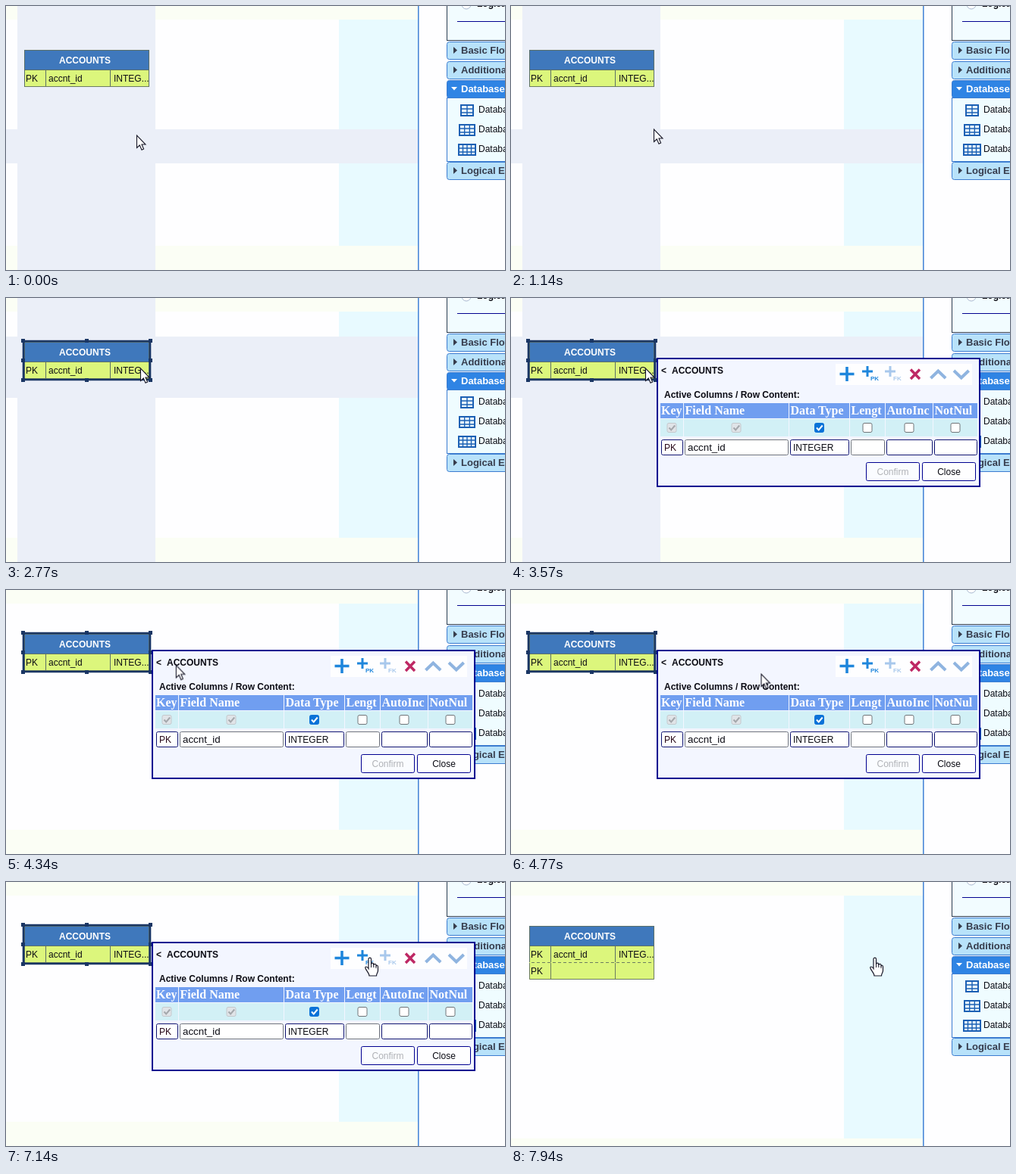
Recreate the animation shown at these times as an HTML page. Size 658 px wide and 349 px high, loop 8000 ms.

```html
<!DOCTYPE html>
<html lang="en">
<head>
<meta charset="utf-8">
<title>Table editor</title>
<style>
html, body { margin: 0; width: 100%; height: 100%; overflow: hidden; background: #fefeff; }
svg { display: block; }
text { font-family: "Liberation Sans", Arial, sans-serif; font-size: 12px; fill: #0c0c14; white-space: pre; }
.b { font-weight: bold; }
.w { fill: #fff; }
.menu { font-size: 13px; font-weight: bold; fill: #363c4c; }
.menu.w { fill: #fff; }
.th { font: bold 16px "Liberation Serif", Times, serif; fill: #fff; }
rect { shape-rendering: crispEdges; }
.soft { shape-rendering: auto; }

.anim { animation: 8s step-end infinite; visibility: hidden; }
#column { animation-name: column; }
#rowLow { animation-name: rowLow; }
#rowMid { animation-name: rowMid; }
#rowTop { animation-name: rowTop; }
#outline { animation-name: outline; }
#handles { animation-name: handles; }
#dialog { animation-name: dialog; }
#added { animation-name: added; }
#arrow { animation-name: arrow; }
#hand { animation-name: hand; }
#pointer { animation: move 8s linear infinite; }

@keyframes column { 0% { visibility: visible; } 52.7% { visibility: hidden; } }
@keyframes rowLow { 0% { visibility: visible; } 17.5% { visibility: hidden; } }
@keyframes rowMid { 17.5% { visibility: visible; } 21.4% { visibility: hidden; } }
@keyframes rowTop { 21.4% { visibility: visible; } 52.7% { visibility: hidden; } }
@keyframes outline { 21.4% { visibility: visible; } 97.2% { visibility: hidden; } }
@keyframes handles { 33% { visibility: visible; } 97.2% { visibility: hidden; } }
@keyframes dialog { 43% { visibility: visible; } 97.2% { visibility: hidden; } }
@keyframes added { 97.2% { visibility: visible; } }
@keyframes arrow { 0% { visibility: visible; } 78.2% { visibility: hidden; } }
@keyframes hand { 78.2% { visibility: visible; } }
@keyframes move {
  0%, 3% { transform: translate(172px, 171px); }
  14.25% { transform: translate(188px, 163px); }
  17.5% { transform: translate(188px, 160px); }
  21.25% { transform: translate(178px, 134px); }
  22.6% { transform: translate(174px, 122px); }
  28%, 50% { transform: translate(177px, 93px); }
  52.7% { transform: translate(193px, 96px); }
  59.6% { transform: translate(329px, 111px); }
  67% { transform: translate(420px, 119px); }
  75.5% { transform: translate(472px, 122px); }
  79%, 100% { transform: translate(480px, 100px); }
}
</style>
</head>
<body>
<svg id="stage" width="658" height="349" viewBox="0 0 658 349"></svg>
<script>
const rect = (x, y, w, h, fill, more = "") =>
  `<rect x="${x}" y="${y}" width="${w}" height="${h}" fill="${fill}" ${more}/>`;
const box = (x, y, w, h, fill, line, radius = 0) =>
  rect(x + .5, y + .5, w - 1, h - 1, fill, `stroke="${line}" rx="${radius}" class="soft"`);
const text = (x, y, s, cls = "", more = "") => `<text x="${x}" y="${y}" class="${cls}" ${more}>${s}</text>`;
const path = (d, stroke, width = 1, fill = "none", more = "") =>
  `<path d="${d}" stroke="${stroke}" stroke-width="${width}" fill="${fill}" ${more}/>`;
const group = (id, body) => `<g id="${id}" class="anim">${body}</g>`;

const PAGE = "#fefeff", MARGIN = "#fbfef5", CYAN = "#e8faff", BAND = "#ebeff8";
const LIME = "#dcf67c", EDGE = "#3c7cd0", NAVY = "#000090", INK = "#2c3c50", BLUE = "#1f86dc";

function canvas() {
  return rect(0, 0, 543, 18, MARGIN) + rect(0, 317, 543, 32, MARGIN) +
    rect(439, 18, 104, 299, CYAN) +
    group("column", rect(15, 0, 182, 349, BAND)) +
    group("rowLow", rect(0, 163, 543, 45, BAND)) +
    group("rowMid", rect(0, 132, 543, 31, BAND)) +
    group("rowTop", rect(0, 51, 543, 81, BAND)) +
    group("added", rect(0, 317, 543, 22, PAGE) + rect(439, 317, 104, 22, CYAN) +
      rect(24, 107, 165, 22, LIME) + text(26, 122, "PK") +
      path("M52.5 107V129M137.5 107V129M24.5 107V128.5H188.5V107", "#6c7c60")) +
    rect(543, 0, 1.6, 349, "#4a88d8", 'class="soft"');
}

function table() {
  const squares = [22, 106, 190].flatMap(x => [56, 82, 108].map(y =>
    x === 106 && y === 82 ? "" : rect(x - 2, y - 2, 5, 5, "#1a3664"))).join("");
  return rect(24, 58, 165, 26, "#3f78bc") + rect(24, 84, 165, 23, LIME) +
    path("M24.5 106V58.5H188.5V106M24 84.5H189M52.5 84V107M137.5 84V107", "#5c7068") +
    path("M24 106.5H189", "#6c7c60") +
    group("added", path("M24 106.5H189", LIME, 1, "none", 'stroke-dasharray="3 4"')) +
    text(70, 76, "ACCOUNTS", "b w") + text(26, 100, "PK") + text(56, 100, "accnt_id") +
    `<svg x="138" y="85" width="50" height="22">${text(4, 15, "INTEG...")}</svg>` +
    group("outline", path("M23 57H190V108H23Z", "#1a3664", 2.6)) + group("handles", squares);
}

function gridIcon(x, y, w, columns) {
  let d = `M${x} ${y + 5}h${w}M${x} ${y + 10}h${w}`;
  for (let i = 1; i < columns; i++) d += `M${x + w * i / columns} ${y}v14`;
  return rect(x, y, w, 14, "#eaf8ff", 'stroke="#1c60b4" stroke-width="2"') + path(d, "#1c60b4", 1.4);
}

function sidebar() {
  const heads = [["Basic Flow", 47], ["Additional", 73], ["Database", 98], ["Logical Element", 206]];
  const bars = heads.map(([name, y]) => {
    const open = name === "Database";
    const mark = open ? `M587 ${y + 9}h8l-4 4.5z` : `M590 ${y + 7}v9l5-4.5z`;
    return box(581, y, 90, 24, open ? "#2f84e4" : "#b8e2fa", EDGE, 3) +
      path(mark, "none", 0, open ? "#fff" : "#363c4c") +
      text(600, y + 16, name, open ? "menu w" : "menu");
  }).join("");
  const items = [[600, 16, 2], [598, 20, 3], [597, 22, 4]].map(([x, w, n], i) =>
    gridIcon(x, 131 + i * 26, w, n) + text(623, 141 + i * 26, "Database")).join("");
  return box(581, -10, 90, 56, "#f2fcff", INK) +
    `<circle cx="607" cy="-2" r="6" fill="#fff" stroke="#a9b8d0"/>` +
    text(621, 1, "Logical", "b") + rect(595, 20, 63, 1, NAVY) +
    box(581, 121, 90, 85, "#effcff", EDGE) + bars + items;
}

const plus = (x, y, r, color, width) => path(`M${x - r} ${y}h${2 * r}M${x} ${y - r}v${2 * r}`, color, width);

function checkbox(x, state) {
  const on = state === "on", faded = state === "faded";
  const fill = on ? "#0a72d8" : faded ? "#e0e4e8" : "#fff";
  return box(x - 6.5, 165, 13, 13, fill, on ? "#0a72d8" : faded ? "#c4c8cc" : "#707478", 2) +
    (state ? path(`M${x - 3.5} 171.5l2.7 3 5-6`, on ? "#fff" : "#a4a8ac", 2) : "");
}

function dialog() {
  const columns = [
    ["Key", 197, 30, "faded", "PK"], ["Field Name", 228, 138, "faded", "accnt_id"],
    ["Data Type", 367, 79, "on", "INTEGER"], ["Lengt", 447, 46, "", ""],
    ["AutoInc", 494, 62, "", ""], ["NotNul", 557, 58, "", ""]];
  const cells = columns.map(([name, x, w, state, value], i) =>
    rect(x, 139, w, 20, "#709ef0") + text(x + (i ? 1.5 : 1), 154, name, "th") +
    rect(x, 160, w, 23, "#d2f0f6") + checkbox(x + w / 2, state) +
    box(x + 1, 187, w - 1, 21, "#fff", i === 1 || i === 3 ? "#70747c" : "#101470", 2) +
    text(x + 5, 202, value, "", i === 0 ? 'style="fill:#280818"' : i === 1 ? 'style="font-size:13.33px"' : "")
  ).join("");
  const small = (x, label, color) => plus(x, 97, 7, color, 3) +
    text(x + 4, 109, label, "b", `style="font-size:8px;fill:${color}"`);
  return rect(193, 80, 425, 169, "#f3f6ff", `stroke="${NAVY}" stroke-width="2"`) +
    rect(428, 87, 180, 28, PAGE) +
    text(198, 100, "&lt;", "b") + text(212, 100, "ACCOUNTS", "b") +
    text(202, 132, "Active Columns / Row Content:", "b") +
    plus(443, 100.5, 9.5, BLUE, 3.6) + small(470, "PK", BLUE) + small(500, "FK", "#a8c8ec") +
    path("M527 94.5l12 12.5M539 94.5l-12 12.5", "#be2864", 3.4) +
    path("M553.5 106l9.8-9.5 9.8 9.5M584 96l9.8 9.5 9.8-9.5", "#8fb4e0", 4) +
    cells +
    box(468, 217, 71, 25, "#fafcff", NAVY, 2) + box(542, 217, 71, 25, PAGE, NAVY, 2) +
    text(503.5, 234, "Confirm", "", 'text-anchor="middle" style="fill:#b0b2b6"') +
    text(577.5, 234, "Close", "", 'text-anchor="middle"');
}

function pointer() {
  const arrow = path("M.5 0V16.5L4.3 13 7 19.2 9.6 18 7 12H12Z", "#181828", 1.1, "#fff");
  const hand = path("M-2 2C-2-.5 1.5-.5 1.5 2V9C1.5 6.5 4.8 6.5 4.8 9V10C5 7.5 8 8 8 10V11.5" +
    "C8.5 9.5 10.5 10 10.5 12V17C10.5 20 8.5 20.5 8.5 24H-1C-1 20.5-5 17-6 14C-7 11.5-4 11-2 14.5Z",
    "#181828", 1.2, "#fff") + path("M1.5 8V13M4.8 9V13M8 11V14", "#181828");
  return `<g id="pointer">${group("arrow", arrow)}${group("hand", hand)}</g>`;
}

// The new row's canvas part and the table's dashed divider share one timing.
document.getElementById("stage").innerHTML =
  canvas() + table() + sidebar() + group("dialog", dialog()) + pointer();
</script>
</body>
</html>
```
